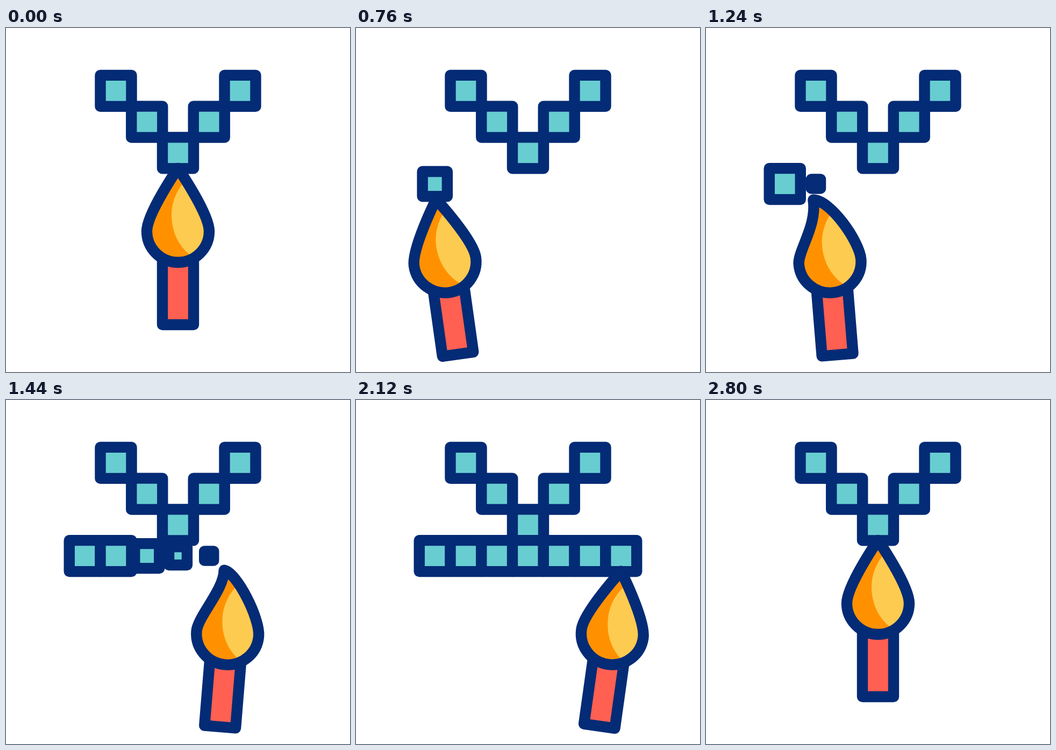
Recreate the animation shown at these times as an HTML page with a canvas. Size 640 px wide and 640 px high, loop 3000 ms.

```html
<!DOCTYPE html>
<html lang="en">
<head>
<meta charset="utf-8">
<title>Pixel brush</title>
<style>
  html, body { margin: 0; width: 100%; height: 100%; overflow: hidden; background: #fff; }
  canvas { display: block; width: 100vmin; height: 100vmin; }
</style>
</head>
<body>
<canvas id="stage" width="640" height="640"></canvas>
<script>
const LOOP = 3000, STEP = 40;
const NAVY = '#042b75', TEAL = '#68cdd1', ORANGE = '#ff9100', YELLOW = '#fdcb50', RED = '#ff6051';
const PITCH = 57.75, SIDE = 58, LINE = 20.4, RADIUS = 58;

const ctx = document.getElementById('stage').getContext('2d');

const clamp = v => Math.min(1, Math.max(0, v));
const span = (t, from, to) => clamp((t - from) / (to - from));
const smooth = u => u * u * (3 - 2 * u);
const mix = (a, b, k) => a + (b - a) * k;

// Same curve as cubic-bezier(.8, 0, .2, 1).
function swing(x) {
  let lo = 0, hi = 1;
  for (let i = 0; i < 30; i++) {
    const s = (lo + hi) / 2, r = 1 - s;
    if (2.4 * r * r * s + 0.6 * r * s * s + s * s * s < x) lo = s; else hi = s;
  }
  return smooth(lo);
}

// Brush poses: centre of the drop and angle in degrees.
const REST = [320, 378, 0], LEFT = [165.4, 434.6, -8], RIGHT = [477.4, 434.6, 8];
const MOVES = [
  { from: 200, to: 760, a: REST, b: LEFT },
  { from: 760, to: 1920, a: LEFT, b: RIGHT },
  { from: 2080, to: 2640, a: RIGHT, b: REST }
];

const GROW_AT = [650, 1208, 1331, 1369, 1408, 1490, 1715];
const GROW_TIME = 200, SHRINK_AT = 2215, SHRINK_LAG = 40, SHRINK_TIME = 338;

function brushPose(t) {
  const move = MOVES.filter(m => t >= m.from).pop();
  if (!move) return REST;
  const k = swing(span(t, move.from, move.to));
  return move.a.map((v, i) => mix(v, move.b[i], k));
}

const bendAt = t => smooth(span(t, 780, 1200)) * (1 - smooth(span(t, 1200, 1920)));

function cellSide(i, t) {
  const grown = 1 - (1 - span(t, GROW_AT[i], GROW_AT[i] + GROW_TIME)) ** 2;
  const start = SHRINK_AT + SHRINK_LAG * i;
  return SIDE * (grown - span(t, start, start + SHRINK_TIME) ** 2);
}

function outlined(path, fill) {
  ctx.fillStyle = fill;
  ctx.fill(path);
  ctx.stroke(path);
}

function box(x, y, w, h, fill) {
  const path = new Path2D();
  path.rect(x, y, w, h);
  outlined(path, fill);
}

function cell(x, y, side) {
  if (side > 0.1) box(x - side / 2, y - side / 2, side, side, TEAL);
}

// The tip trails to the left as the bend goes from 0 to 1.
function dropPath(bend) {
  const tipX = -21.8 * bend, tipY = -117, path = new Path2D();
  path.moveTo(tipX, tipY);
  path.bezierCurveTo(-18 * bend, mix(tipY, -68, bend), -RADIUS, mix(-33, -25, bend), -RADIUS, 0);
  path.arc(0, 0, RADIUS, Math.PI, 0, true);
  path.bezierCurveTo(RADIUS, -33, 10 * bend, mix(tipY, -115, bend), tipX, tipY);
  path.closePath();
  return path;
}

const shine = new Path2D('M14-95C-4-75-12-52-12-31C-12 0 0 28 26 47H80V-95Z');

function brush([x, y, angle], bend) {
  const drop = dropPath(bend);
  ctx.save();
  ctx.translate(x, y);
  ctx.rotate(angle * Math.PI / 180);
  box(-SIDE / 2, 40, SIDE, 134, RED);
  ctx.fillStyle = ORANGE;
  ctx.fill(drop);
  ctx.save();
  ctx.clip(drop);
  ctx.fillStyle = YELLOW;
  ctx.fill(shine);
  ctx.restore();
  ctx.stroke(drop);
  ctx.restore();
}

function draw(t) {
  ctx.fillStyle = '#fff';
  ctx.fillRect(0, 0, 640, 640);
  ctx.strokeStyle = NAVY;
  ctx.lineWidth = LINE;
  ctx.lineJoin = 'round';
  for (let i = -2; i <= 2; i++) cell(320 + i * PITCH, 232.4 - Math.abs(i) * PITCH, SIDE);
  for (let i = 0; i < 7; i++) cell(320 + (i - 3) * PITCH, 290.1, cellSide(i, t));
  brush(brushPose(t), bendAt(t));
}

const begin = performance.now();
function tick() {
  const t = (performance.now() - begin) % LOOP;
  draw(Math.floor(t / STEP) * STEP);
  requestAnimationFrame(tick);
}
tick();
</script>
</body>
</html>
```
